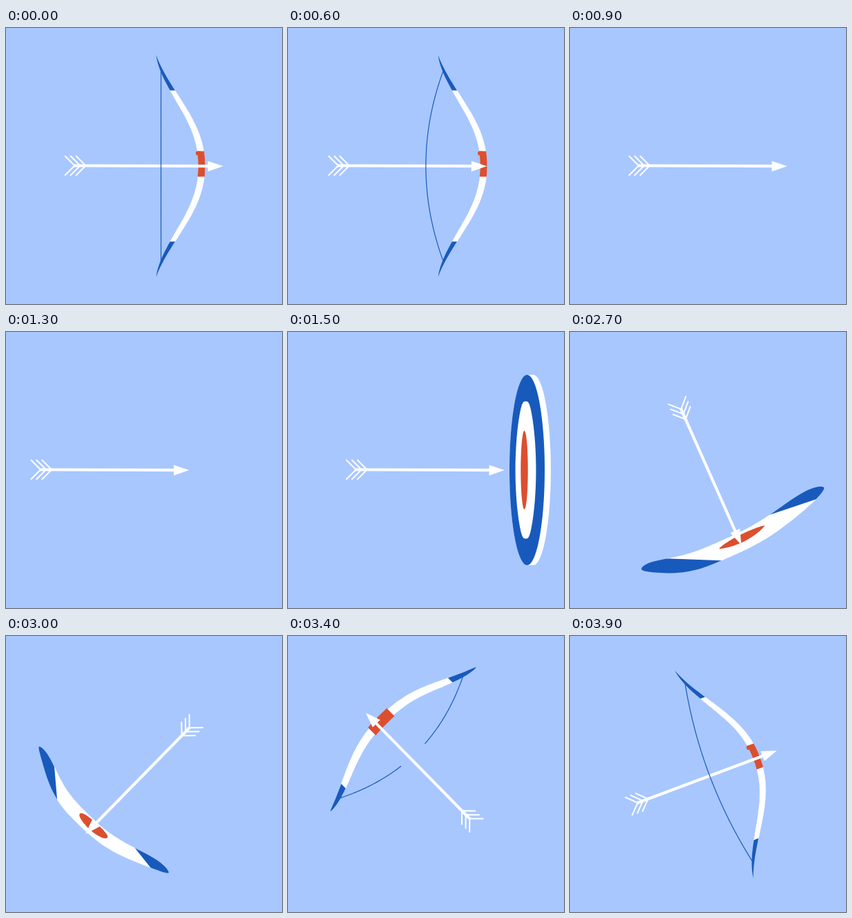
Write an HTML page with a canvas that moves like this. It is 400x400 px and loops after 4 s.

```html
<!DOCTYPE html>
<html lang="en">
<head>
<meta charset="utf-8">
<title>Bow and target</title>
<style>
html, body { margin: 0; height: 100%; overflow: hidden; background: #a8c7ff; }
canvas { display: block; width: 100vw; height: 100vh; }
</style>
</head>
<body>
<canvas width="400" height="400"></canvas>
<script>
const ctx = document.querySelector('canvas').getContext('2d');
const SKY = '#a8c7ff', BLUE = '#185abc', RED = '#db4f30', WHITE = '#fff';
const LOOP = 4000, STEP = 100, SPIN_START = 2411, SPIN_END = 3991;

// Piecewise linear track: time, value, time, value, ...
function track(t, ...keys) {
  if (t <= keys[0]) return keys[1];
  for (let i = 2; i < keys.length; i += 2) {
    if (t <= keys[i]) {
      const k = (t - keys[i - 2]) / (keys[i] - keys[i - 2]);
      return keys[i - 1] + (keys[i + 1] - keys[i - 1]) * k;
    }
  }
  return keys[keys.length - 1];
}

// Disc and bow are the same body: a spine x(y) with a blue coat,
// a white face and a red centre. x runs along the arrow, y across it.
// round and blunt shape the ends; faceFall and gripFall taper the layers.
const DISC = {
  y: 0, h: 138, mid: 116.5, tip: 116.5, bend: 1, skew: 0, w: 25.5, round: 2, blunt: .5, depth: 9,
  faceX: -2, faceY: 0, faceH: 99.5, faceW: .57, faceFall: .32, slant: 0,
  gripX: -4, gripY: 0, gripH: 57, gripW: 5.2, gripFall: .5
};
const BOW = {
  y: 0, h: 161, mid: 83.5, tip: 17.5, bend: 1.1, skew: 0, w: 4.5, round: 4, blunt: 1, depth: 0,
  faceX: 0, faceY: 0, faceH: 109.5, faceW: 1, faceFall: 0, slant: 0,
  gripX: 0, gripY: -3, gripH: 18.5, gripW: 5, gripFall: 0
};
const FOLDED = {
  ...BOW, y: 2, h: 145, mid: 114.7, tip: 92, bend: 1.5, skew: .15, w: 13, round: 5, blunt: .6,
  faceY: -9.5, faceH: 80.5, slant: 36,
  gripX: -4, gripY: -5, gripH: 37, gripW: 5.5, gripFall: .8
};
const OPENING = {
  ...BOW, y: 12, h: 148.5, mid: 100, tip: 59, bend: 1.2, w: 5.7, blunt: .7,
  faceY: 11.6, faceH: 109, gripY: 7, gripH: 19.5, gripW: 8
};

const poseAt = t => Object.fromEntries(Object.keys(DISC).map(k =>
  [k, track(t, SPIN_START, DISC[k], 2700, FOLDED[k], 3400, OPENING[k], 3600, BOW[k])]));

const along = (p, y) => Math.max(-1, Math.min(1, (y - p.y) / p.h));

function spine(p, y) {
  const u = along(p, y), s = Math.abs(u - p.skew * (1 - u * u));
  const curl = 2.75;
  const drop = (1 - Math.cos(curl * s ** p.bend)) / (1 - Math.cos(curl));
  return p.mid + (p.tip - p.mid) * drop;
}
const halfWidth = (p, y) => p.w * (1 - Math.abs(along(p, y)) ** p.round) ** p.blunt;
const taper = (v, fall) => Math.max(0, 1 - v * v) ** fall;

// Fills a strip that follows the spine; half(v, y) is its half width, v from -1 to 1.
function strip(p, color, { x = 0, y, h, slant = 0, depth = 0 }, half) {
  const n = 60;
  ctx.fillStyle = color;
  ctx.beginPath();
  for (const side of [-1, 1]) {
    for (let i = 0; i <= n; i++) {
      const v = -side * Math.sin((i / n - .5) * Math.PI);
      const py = y + h * v - side * slant;
      ctx.lineTo(spine(p, py) + x + side * half(v, py) + (side > 0 ? depth : 0), py);
    }
  }
  ctx.fill();
}

function drawBody(p, t) {
  const coat = (v, y) => halfWidth(p, y);
  if (p.depth) strip(p, WHITE, p, coat0(coat));
  strip(p, BLUE, { y: p.y, h: p.h }, coat);
  strip(p, WHITE, { x: p.faceX, y: p.faceY, h: p.faceH, slant: p.slant },
    (v, y) => halfWidth(p, y) * p.faceW * taper(v, p.faceFall) + .4);
  strip(p, RED, { x: p.gripX, y: p.gripY, h: p.gripH }, v => p.gripW * taper(v, p.gripFall));
  if (t > 3500) {
    ctx.beginPath();
    ctx.roundRect(75, -21.5, 8, 6, 2.5);
    ctx.fill();
  }
}
// The rear rim stays just inside the coat on the near side.
function coat0(coat) {
  return (v, y) => Math.max(0, coat(v, y) - .1);
}

// The string grows from both tips until the halves meet.
function drawString(p, t, sag) {
  const gap = track(t, 3100, 150, 3400, 23, 3480, 0);
  const reach = p.h * .852, top = p.y - reach, bottom = p.y + reach;
  const x0 = spine(p, top) - 1.5, x1 = spine(p, bottom) - 1.5;
  ctx.strokeStyle = BLUE;
  ctx.lineWidth = 1.2;
  ctx.beginPath();
  let pen = 'moveTo';
  for (let k = 0; k <= 1; k += 1 / 128) {
    const x = (1 - k) ** 2 * x0 + 2 * k * (1 - k) * sag + k * k * x1;
    const y = top + (bottom - top) * k;
    ctx[pen](x, y);
    pen = Math.abs(y - 5) < gap ? 'moveTo' : 'lineTo';
  }
  ctx.stroke();
}

function drawArrow() {
  ctx.strokeStyle = ctx.fillStyle = WHITE;
  ctx.lineCap = 'round';
  ctx.lineWidth = 2;
  ctx.beginPath();
  for (const x of [-100.5, -92.5, -84.5]) {
    ctx.moveTo(x - 13.7, -14.2);
    ctx.lineTo(x, -.5);
    ctx.lineTo(x - 13.7, 13.2);
  }
  ctx.stroke();
  ctx.lineCap = 'butt';
  ctx.lineWidth = 4.2;
  ctx.beginPath();
  ctx.moveTo(-102, -.5);
  ctx.lineTo(94, .2);
  ctx.stroke();
  ctx.beginPath();
  ctx.moveTo(92.5, -7.3);
  ctx.lineTo(114.7, .2);
  ctx.lineTo(92.5, 8);
  ctx.fill();
}

function shifted(x, y, paint) {
  ctx.save();
  ctx.translate(x, y);
  paint();
  ctx.restore();
}

function arrowShift(t) {
  if (t < 900) return track(t, 400, 0, 700, -40, 800, 74, 900, 0);
  if (t < 1500) return -57 * Math.sin(Math.PI * (t - 900) / 600);
  return track(t, 1500, -1, 1700, 0, 2400, 0, 2700, 4, 3400, 10, 3900, -9.5, LOOP, 0);
}

function draw(t) {
  ctx.fillStyle = SKY;
  ctx.fillRect(0, 0, 400, 400);
  ctx.save();
  ctx.translate(200, 200);
  ctx.rotate(track(t, SPIN_START, 0, SPIN_END, 2 * Math.PI));

  const shooting = t < 900, spinning = t > SPIN_START;
  const bodyTime = shooting ? LOOP : t, p = poseAt(bodyTime);
  const swayY = track(t, 3600, 0, 3900, 3.5, LOOP, 0);
  let bodyX = track(t, 1100, 200, 1500, 30, 1600, -8, 2000, 0);
  let sag = track(t, 3400, 0, 3900, -3, LOOP, 24.5);
  if (shooting) {
    bodyX = track(t, 700, 0, 800, -172);
    sag = track(t, 400, 24.5, 700, -50, 800, 24.5);
  } else if (spinning) {
    bodyX = track(t, 3600, 0, 3900, -9.5, LOOP, 0);
  }
  // The limbs pull in halfway through the spin.
  const squeeze = track(t, 2700, 1, 2950, .87, 3150, .97, 3400, 1);

  if (shooting || t >= 1100) {
    shifted(bodyX, swayY, () => {
      ctx.scale(1, squeeze);
      drawBody(p, bodyTime);
    });
  }
  shifted(arrowShift(t), swayY, drawArrow);
  if (shooting || t > 3100) shifted(bodyX, swayY, () => drawString(p, bodyTime, sag));
  ctx.restore();
}

const start = performance.now();
function tick() {
  const t = (performance.now() - start) % LOOP;
  draw(Math.floor(t / STEP) * STEP);
  requestAnimationFrame(tick);
}
tick();
</script>
</body>
</html>
```
